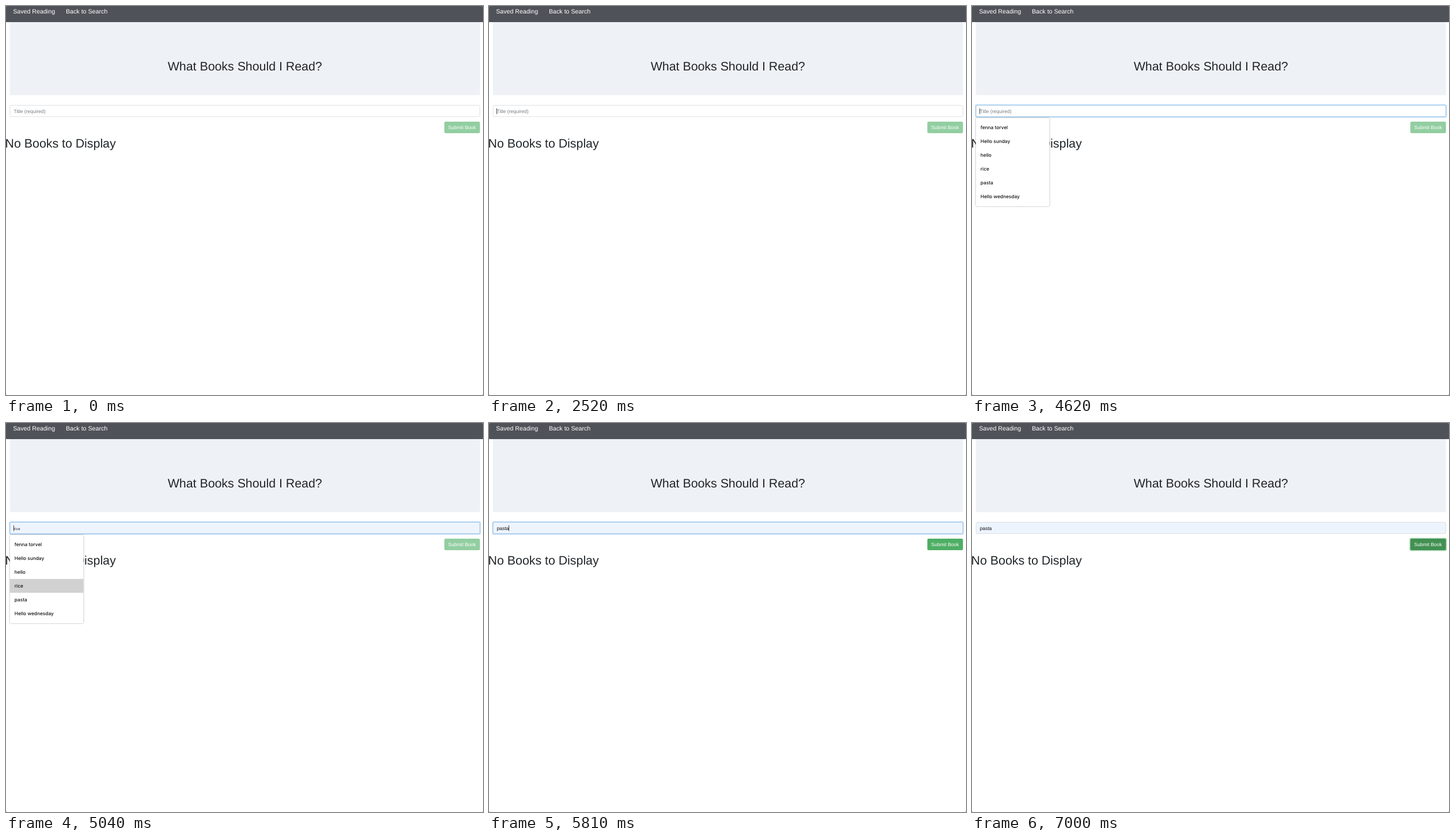
Animation, 828 px wide and 676 px high, one loop 7.14 s. Source, as an HTML page:

```html
<!DOCTYPE html>
<html lang="en">
<head>
<meta charset="utf-8">
<title>Book search</title>
<style>
  html, body { margin: 0; width: 100%; height: 100%; overflow: hidden; background: #fff; }
  svg { display: block; width: 828px; height: 676px; }
  text { font-family: "Liberation Sans", Arial, sans-serif; font-size: 8.53px; text-rendering: geometricPrecision; white-space: pre; }
  .nav { font-size: 10.67px; fill: #fff; }
  .head { font-size: 21.33px; fill: #212529; }
  .item { font-family: Inter, sans-serif; font-size: 8.3px; font-weight: 500; fill: #111; }
  .menu { filter: drop-shadow(0 .6px 1px rgba(0, 0, 0, .4)); }
</style>
</head>
<body>
<svg viewBox="0 0 828 676">
  <rect width="828" height="676" fill="#fff"/>
  <rect width="828" height="28" fill="#505259"/>
  <text class="nav" x="12.2" y="13.3">Saved Reading</text>
  <text class="nav" x="104" y="13.3">Back to Search</text>
  <path d="M6.7 28H822.8V152.6a2.5 2.5 0 0 1-2.5 2.5H9.2a2.5 2.5 0 0 1-2.5-2.5z" fill="#eef1f5"/>
  <text class="head" x="414.7" y="111.8" text-anchor="middle">What Books Should I Read?</text>

  <rect id="ring" x="5.4" y="170.9" width="818.7" height="23" rx="3.2" fill="#bcd9f3"/>
  <rect id="field" x="7" y="172.5" width="815.5" height="19.7" rx="2" stroke-width=".7"/>
  <text id="value" x="13.5" y="185.8"></text>
  <rect id="caret" y="177.8" width=".8" height="10" fill="#111"/>

  <rect id="glow" x="759.3" y="199.5" width="65" height="23" rx="3.2" fill="#b1dcbb"/>
  <rect id="button" x="760.9" y="201.1" width="61.8" height="19.8" rx="2"/>
  <text x="791.7" y="214.2" text-anchor="middle" fill="#fff">Submit Book</text>

  <text class="head" x="-1.4" y="246.2">No Books to Display</text>

  <g id="menu">
    <rect class="menu" x="6.7" y="194.6" width="127.8" height="153.4" rx="2" fill="#fff"/>
    <rect id="hover" x="6.7" width="127.8" height="24" fill="#d1d1d1"/>
    <g id="items"></g>
  </g>
  <path d="M0 673.5a2.5 2.5 0 0 0 2.5 2.5H0zM828 673.5a2.5 2.5 0 0 1-2.5 2.5H828zM0 0H1.5L0 1.5zM828 0H826.5L828 1.5z" fill="#a5a5a5"/>
</svg>
<script>
const LOOP = 7140, STEP = 70;
const choices = ["fenna torvel", "Hello sunday", "hello", "rice", "pasta", "Hello wednesday"];
const $ = id => document.getElementById(id);
const set = (el, attrs) => { for (const k in attrs) el.setAttribute(k, attrs[k]); };
const show = (el, on) => set(el, { visibility: on ? "visible" : "hidden" });
const ramp = (t, from, to) => Math.min(1, Math.max(0, (t - from) / (to - from)));
const mix = (a, b, k) => `rgb(${a.map((v, i) => Math.round(v + (b[i] - v) * k))})`;

const WHITE = [255, 255, 255], FILLED = [238, 244, 254];
const BORDER = [208, 212, 217], FOCUS = [137, 186, 227];
const GREEN = [78, 174, 100], DARK = [66, 144, 82];

const [ring, field, value, caret, glow, button, menu, hover, items] =
  ["ring", "field", "value", "caret", "glow", "button", "menu", "hover", "items"].map($);

choices.forEach((label, i) => {
  const item = document.createElementNS("http://www.w3.org/2000/svg", "text");
  set(item, { class: "item", x: 14.8, y: 214 + 24 * i });
  item.textContent = label;
  items.append(item);
});

function caretOn(t) {
  if (t < 2520 || t >= 6300) return false;
  return !(t >= 3080 && t < 3570) && !(t >= 4130 && t < 4620);
}

function draw(time) {
  const t = Math.floor(time / STEP) * STEP;
  const blur = ramp(t, 6840, 7000);
  const focus = ramp(t, 2520, 2660) * (1 - blur);
  const preview = t >= 4970 && t < 5810;
  const chosen = t >= 5810;
  const pick = t < 5320 ? 3 : 4;

  set(ring, { opacity: focus });
  set(field, {
    fill: mix(WHITE, FILLED, ramp(t, 4900, 5040)),
    stroke: mix(BORDER, FOCUS, focus)
  });

  value.textContent = preview || chosen ? choices[pick] : "Title (required)";
  set(value, {
    fill: preview || chosen ? "#111" : "#757a80",
    style: preview ? "font-family:Inter,sans-serif;font-size:6.2px" : ""
  });
  set(caret, { x: chosen ? 34 : 13.1 });
  show(caret, caretOn(t));

  show(menu, t >= 2660 && !chosen);
  set(hover, { y: 199 + 24 * pick, opacity: preview ? 1 : 0 });

  set(glow, { opacity: blur });
  set(button, { fill: chosen ? mix(GREEN, DARK, t < 6720 ? 0 : 1) : "#92cea1" });
}

const start = performance.now();
(function tick() {
  draw((performance.now() - start) % LOOP);
  requestAnimationFrame(tick);
})();
</script>
</body>
</html>
```
